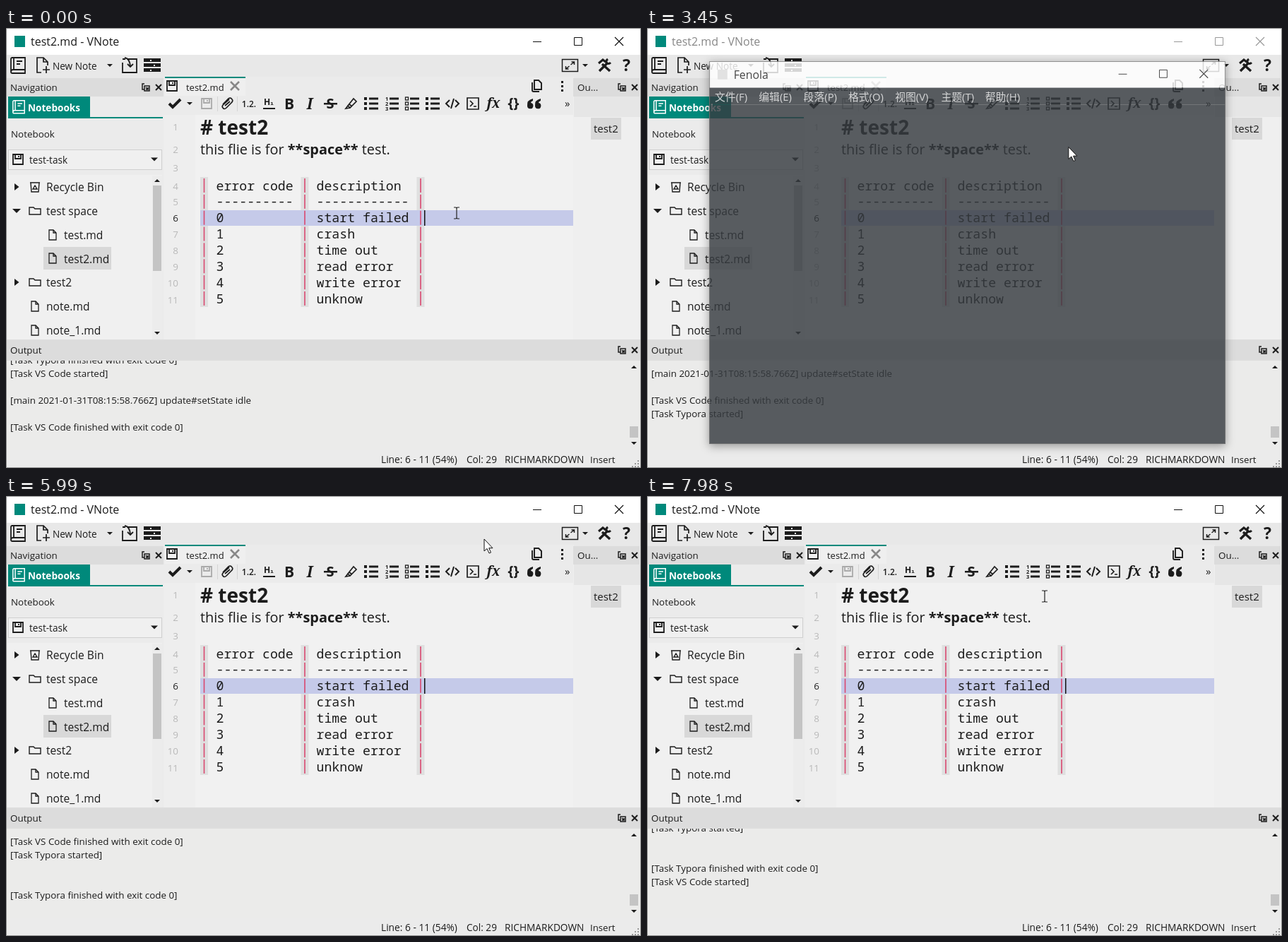
Recreate the animation shown at these times as an HTML page with a canvas. Size 899 by 623 pixels, loop 8 s.

```html
<!DOCTYPE html>
<html lang="en">
<head>
<meta charset="utf-8">
<title>Editor tasks</title>
<style>
html, body { margin: 0; width: 100%; height: 100%; overflow: hidden; background: #ebebeb; }
canvas { display: block; }
</style>
</head>
<body>
<canvas id="stage" width="899" height="623"></canvas>
<script>
const ctx = document.getElementById('stage').getContext('2d');
const SANS = '"Open Sans", "Noto Sans CJK SC", "Noto Sans CJK", sans-serif';
const MONO = '"Noto Sans Mono", monospace';
const ARIAL = '"Liberation Sans", "Noto Sans CJK SC", sans-serif';
const INK = '#1c1c1c', TEAL = '#00897b';
const LOOP = 8000;

// Screen updates come in bursts: [first, last, count]
const BURSTS = [[440, 1220, 11], [1300, 2070, 11], [2140, 2680, 8], [2830, 2910, 2],
  [3140, 3600, 7], [3760, 4520, 11], [4600, 5370, 11], [5450, 6220, 11],
  [6290, 7060, 11], [7140, 7910, 11], [7980, 8060, 2]];

// Pointer path: [time, x, y]
const POINTER = [[440, 638, 262], [800, 430, 70], [1000, 290, 8], [1220, 212, 31],
  [1450, 205, 52], [1600, 206, 56], [2070, 265, 118], [2140, 275, 118], [2450, 483, 118],
  [2680, 488, 121], [3140, 488, 121], [3450, 598, 169], [3990, 640, 148], [4600, 712, 168],
  [5290, 710, 171], [5370, 722, 95], [5600, 793, 62], [5760, 793, 62], [6220, 560, 60],
  [6520, 201, 53], [6700, 203, 58], [6900, 300, 116], [7060, 440, 120], [7250, 500, 150],
  [7400, 500, 150], [7910, 548, 142], [7980, 563, 142]];

const FAILED = [['0', 'start failed'], ['1', 'crash'], ['2', 'time out'],
  ['3', 'read error'], ['4', 'write error'], ['5', 'unknow']];

const within = (t, a, b) => t >= a && t < b;
const clamp = v => Math.max(0, Math.min(1, v));

function settle(t) {
  let shown = 0;
  for (const [a, b, n] of BURSTS) {
    if (t < a) break;
    const step = (b - a) / (n - 1);
    shown = Math.min(b, a + Math.floor((t - a + 5) / step) * step);
  }
  return shown;
}

function pointerAt(t) {
  const i = POINTER.findIndex(p => p[0] > t);
  if (i === 0) return POINTER[0].slice(1);
  if (i < 0) return POINTER[POINTER.length - 1].slice(1);
  const [t0, x0, y0] = POINTER[i - 1], [t1, x1, y1] = POINTER[i];
  const p = (t - t0) / (t1 - t0);
  return [x0 + (x1 - x0) * p, y0 + (y1 - y0) * p];
}

function box(x, y, w, h, color) {
  ctx.fillStyle = color;
  ctx.fillRect(x, y, w, h);
}

function frame(x, y, w, h, color, width = 1) {
  ctx.strokeStyle = color;
  ctx.lineWidth = width;
  ctx.strokeRect(x, y, w, h);
}

// Text with y at the middle of the capitals; returns the end x
function text(s, x, y, size = 13.4, color = INK, weight = '', family = SANS, align = 'left') {
  ctx.font = `${weight} ${size}px ${family}`;
  ctx.fillStyle = color;
  ctx.textAlign = align;
  ctx.fillText(s, x, y + size * 0.36);
  return x + ctx.measureText(s).width;
}

function line(d, x, y, color = INK, width = 1.6) {
  ctx.save();
  ctx.translate(x, y);
  ctx.strokeStyle = color;
  ctx.lineWidth = width;
  ctx.stroke(new Path2D(d));
  ctx.restore();
}

function fill(d, x, y, color = INK) {
  ctx.save();
  ctx.translate(x, y);
  ctx.fillStyle = color;
  ctx.fill(new Path2D(d));
  ctx.restore();
}

const down = (x, y, r = 4) => fill(`M${-r} ${-r / 2}H${r}L0 ${r / 2}Z`, x, y);
const up = (x, y, r = 4) => fill(`M${-r} ${r / 2}H${r}L0 ${-r / 2}Z`, x, y);
const right = (x, y, r = 5) => fill(`M${-r * .6} ${-r}V${r}L${r * .7} 0Z`, x, y);
const cross = (x, y, r, color, w) => line(`M${-r} ${-r}L${r} ${r}M${r} ${-r}L${-r} ${r}`, x, y, color, w);

function dockTitle(label, x, w, y) {
  box(x, y - 13, w, 26, '#dcdcdc');
  text(label, x + 6, y);
  const r = x + w;
  line('M-2 -5H-5V3H-2M-2 -2H5V5H-2ZM0 0L3 3M3 0V3H0', r - 25, y, INK, 1.5);
  cross(r - 7, y, 4, INK, 2);
}

function windowButtons(x, y, gap, color) {
  line('M-6 .5H6', x, y, color, 1);
  line('M-5.5 -5.5H5.5V5.5H-5.5Z', x + gap, y, color, 1);
  cross(x + gap * 2, y, 6, color, 1.2);
}

function book(x, y, color, s = 1) {
  ctx.save();
  ctx.translate(x, y);
  ctx.scale(s, s);
  line('M2 1H21V23H3Q1 23 1 21V3Q1 1 3 1M5 1V18M1 21Q1 18 4 18H21M9 6H17M9 10H14', 0, 0, color, 1.8);
  ctx.restore();
}

const floppy = (x, y, color) => line('M-7 -7H7V7H-7ZM-4 -7V-1H4V-7M1 -5V-3', x, y, color, 1.8);
const file = (x, y) => line('M-5 -7H1L5 -3V7H-5ZM1 -7V-3H5', x, y, INK, 1.3);
const folder = (x, y) => line('M-8 5V-5H-2L0 -3H8V5Z', x, y, INK, 1.4);

function bullets(x, y, dots = true) {
  for (const dy of [-7, 0, 7]) {
    if (dots) box(x - 10, y + dy - 2, 4, 4, INK);
    box(x - 3, y + dy - 1.5, 13, 3, INK);
  }
}

function drawToolbar(pressed, hover) {
  box(0, 38, 899, 33, '#e8e8e8');
  if (pressed || hover) box(195, 40, 25, 27, pressed ? '#c8c8c8' : '#dadada');
  book(6, 41, INK);
  line('M7 22H1V1H10L16 7V12M10 1V7H16M14 13V23M9 18H19', 43, 41, INK, 1.7);
  text('New Note', 66, 54, 13.6);
  down(147, 53);
  line('M8 3H21V22H1V8M1 3H5M4 1Q11 2 12 13M8 10L12 14L16 10', 164, 41, INK, 1.8);
  for (const [i, y] of [43, 50, 57].entries()) {
    box(195, y, 24, 5, INK);
    box(198 + (i === 1 ? 11 : 6), y + 2, 2, 2, '#e8e8e8');
  }
  frame(787.5, 44.5, 22, 17, INK, 1.5);
  line('M-6 5L-1 1M6 -5L1 -1M-6 1V5H-2M6 -1V-5H2', 798.5, 53, INK, 1.5);
  down(820, 53);
  line('M-7 8L5 -4M-3 -2L8 8', 847, 53, INK, 3.4);
  line('M-8 -3L-2 -8L2 -5M9 -4Q6 -1 3 -4Q2 -7 5 -9', 847, 53, INK, 3);
  text('?', 873, 53, 23, INK, 'bold');
}

function drawNavigation() {
  box(0, 96, 223, 346, '#ebebeb');
  dockTitle('Navigation', 0, 223, 84);
  box(3, 97, 116, 30, TEAL);
  box(3, 126, 219, 2, TEAL);
  book(9, 102, '#fff', .82);
  text('Notebooks', 31, 113, 13.6, '#fff', 'bold');
  text('Notebook', 7, 150);
  box(3, 172, 218, 29, '#f0f0f0');
  frame(3.5, 172.5, 217, 28, '#cfcfcf');
  floppy(17, 186, INK);
  text('test-task', 33, 187, 13.6);
  down(210, 186, 5);
  box(2, 208, 219, 233, '#f0f0f0');
  box(53, 310, 96, 32, '#d8d8d8');
  right(15, 225); down(15, 259, 6); right(15, 360);
  line('M-6 -6H6L5 7H-5ZM-7 -6H7M-3 3L0 -2L3 3Z', 41, 225, INK, 1.4);
  folder(41, 259); folder(41, 360);
  file(66, 293); file(66, 326); file(41, 394); file(41, 428);
  [['Recycle Bin', 57], ['test space', 57], ['test.md', 82], ['test2.md', 82], ['test2', 57],
    ['note.md', 57], ['note_1.md', 57]].forEach(([s, x], i) => text(s, x, 225.5 + i * 33.8, 15.6));
  box(207, 209, 14, 232, '#ececec');
  box(208, 223, 12, 121, '#c4c4c4');
  up(214, 216); down(214, 432);
}

function drawEditorBar() {
  box(223, 69, 581, 54, '#ebebeb');
  box(225, 69, 114, 27, '#efefef');
  box(225, 69, 114, 2, TEAL);
  floppy(235, 82, INK);
  text('test2.md', 255, 84, 13);
  cross(324, 82, 6, '#888', 2.6);
  line('M-3 -8H3L7 -4V5H-3ZM-6 -5V6Q-6 8 -4 8H4', 751, 82, INK, 1.9);
  for (const dy of [-6, 0, 6]) box(786, 81 + dy, 3, 3, INK);

  line('M-8 0L-3 5L8 -6', 239, 107, INK, 4);
  down(260, 107);
  floppy(284, 107, '#aaa');
  line('M-7 1L1 -7Q4 -9 6 -6Q8 -4 5 -1L-2 6Q-5 9 -7 6Q-9 4 -6 1L2 -6M-4 3L3 -3', 314, 107, INK, 1.7);
  text('1.2.', 344, 108, 12, INK, '600', SANS, 'center');
  box(299, 97, 1, 21, '#d4d4d4'); box(327, 97, 1, 21, '#d4d4d4');
  text('H₁', 372, 105, 12, INK, 'bold', SANS, 'center');
  box(364, 113, 17, 2, INK);
  text('B', 401, 107, 21, INK, 'bold', SANS, 'center');
  text('I', 430, 107, 21, INK, 'italic bold', '"Noto Serif", serif', 'center');
  text('S', 459, 107, 20, INK, 'bold', SANS, 'center');
  box(450, 106, 19, 2.5, INK);
  line('M-4 3L4 -7L8 -3L-1 6ZM-4 3L-7 7L-1 6M-2 1L2 4', 488, 107, INK, 1.7);
  bullets(517, 107);
  bullets(546, 107, false);
  [1, 2, 3].forEach((n, i) => text(n, 537, 100 + i * 7, 7.5, INK, 'bold'));
  bullets(575, 107, false);
  for (const y of [99, 106, 113]) frame(565.5, y - 1, 4, 4, INK, 1.3);
  bullets(604, 107);
  line('M-4 -5L-9 0L-4 5M4 -5L9 0L4 5M2 -7L-2 7', 632, 107, INK, 2);
  line('M-8 -8H8V8H-8ZM-4 -4L0 0L-4 4M1 4H5', 661, 107, INK, 1.7);
  text('fx', 690, 106, 19, INK, 'italic bold', '"Noto Serif", serif', 'center');
  text('{}', 718.5, 106, 20, INK, 'bold', SANS, 'center');
  for (const x of [738, 749]) fill('M0 10Q-1 2 8 0L8 3Q5 4 5 6A4.2 4.2 0 1 1 0 10Z', x, 100);
  text('»', 791, 107, 15);
}

function drawEditor(caret) {
  box(223, 123, 45, 318, '#eeeeee');
  box(268, 123, 535, 318, '#f1f1f1');
  [140, 172, 198, 224, 246, 269, 292, 315, 338, 361, 385].forEach((y, i) =>
    text(i + 1, 244, y, 13.4, i === 5 ? '#222' : '#b9b9b9', '', SANS, 'right'));
  text('# test2', 275, 140.5, 28, INK, 'bold');
  let x = text('this flie is for ', 275, 172, 19.9);
  x = text('**space**', x, 172, 19.9, INK, 'bold');
  text(' test.', x, 172, 19.9);

  const pipes = [280.5, 423, 587];
  for (const p of pipes) box(p - 5.5, 211, 11, 184, '#dfdfdf');
  box(275, 258, 528, 22, '#c5cae9');
  [['error code', 'description'], ['----------', '------------'], ...FAILED].forEach((row, i) => {
    const y = 223 + i * 22.85;
    row.forEach((s, c) => text(s, c ? 439.5 : 297.5, y, 18.2, INK, '', MONO));
    for (const p of pipes) box(p - .8, y - 10, 1.6, 20, '#d9486f');
  });
  if (caret) box(592, 258, 1.5, 22, '#111');
}

function drawOutline() {
  box(803, 96, 96, 346, '#efefef');
  dockTitle('Ou...', 803, 94, 84);
  box(804, 97, 94, 29, '#e6e6e6');
  box(828, 127, 43, 31, '#d8d8d8');
  text('test2', 832, 143, 15);
}

function drawOutput(t) {
  box(0, 441, 899, 30, '#dddddd');
  dockTitle('Output', 0, 897, 456);
  box(0, 471, 899, 126, '#ebebea');
  const typora = '[Task Typora finished with exit code 0]';
  const code = '[Task VS Code finished with exit code 0]';
  const update = '[main 2021-01-31T08:15:58.766Z] update#setState idle';
  const typoraStart = '[Task Typora started]', codeStart = '[Task VS Code started]';
  const log =
    t < 2900 ? [typora, codeStart, , update, , code] :
    t < 5830 ? [, update, , code, typoraStart] :
    t < 7500 ? [, code, typoraStart, , , typora] :
    [typoraStart, , , typora, codeStart];
  ctx.save();
  ctx.beginPath();
  ctx.rect(0, 471, 880, 125);
  ctx.clip();
  log.forEach((s, i) => text(s, 6, 470.5 + i * 18.85, 13.4));
  ctx.restore();
  up(889, 480); down(889, 588);
  box(883, 564, 12, 16, '#c4c4c4');
  box(0, 597, 899, 26, '#ebebeb');
  text('Line: 6 - 11 (54%)', 531, 611, 13.75);
  text('Col: 29', 652, 611, 13.6);
  text('RICHMARKDOWN', 706, 611, 13.7);
  text('Insert', 827, 611, 13.2);
  for (let i = 0; i < 3; i++) for (let j = 0; j <= i; j++) box(894 - j * 4, 612 + i * 4, 2, 2, '#999');
}

function panel(x, y, w, h) {
  box(x + 3, y + 3, w, h, '#808080');
  box(x, y, w, h, '#ebebeb');
  frame(x + .5, y + .5, w - 1, h - 1, '#b0b0b0');
}

function drawMenu(sub, px, py) {
  panel(192, 68, 242, 67);
  if (sub || py > 102) box(193, 102, 240, 32, '#d0d0d0');
  else if (py > 70) box(193, 70, 240, 32, '#d0d0d0');
  for (const y of [79, 86, 93]) {
    line('M0 0L2 2L6 -3', 199, y - 1, INK, 1.6);
    box(207, y - 1.5, 12, 2.4, INK);
  }
  text('Hello Tasks', 248, 86, 15.8);
  text('Alt+H, T', 341, 86, 15.8);
  text('Open File with', 248, 118, 15.5);
  right(424, 86, 4); right(424, 118, 4);
  if (!sub) return;
  panel(430, 101, 150, 65);
  if (px > 430) box(431, py < 133 ? 102 : 133, 148, 31, '#d0d0d0');
  box(441, 111, 13, 13, '#aaa');
  box(441, 142, 14, 14, INK);
  text('Fenola', 486, 118, 15.5);
  text('LB Pane', 486, 150, 15.5);
}

// Casts a soft shadow outside the box only, so a fading window stays clear
function softShadow(x, y, w, h) {
  ctx.save();
  ctx.beginPath();
  ctx.rect(0, 0, 899, 623);
  ctx.rect(x, y, w, h);
  ctx.clip('evenodd');
  ctx.shadowColor = 'rgba(0,0,0,.45)';
  ctx.shadowBlur = 12;
  ctx.shadowOffsetY = 3;
  box(x, y, w, h, '#000');
  ctx.restore();
}

function drawViewer(t, scroll) {
  const loaded = t >= 3750;
  softShadow(84, 44, 739, 548);
  box(84, 44, 739, 38, '#fff');
  box(84, 82, 739, 24, loaded ? '#27282c' : '#363b40');
  box(84, 106, 739, 486, '#363b40');
  box(96, 56, 14, 14, '#dddddd');
  text((loaded ? 'test2.md - ' : '') + 'Fenola', 119, 63, 16);
  windowButtons(676, 62, 58, '#222');
  [['文件(F)', 92], ['编辑(E)', 155], ['段落(P)', 219], ['格式(O)', 283], ['视图(V)', 350],
    ['主题(T)', 416], ['帮助(H)', 479]].forEach(([s, x]) => text(s, x, 95, 15, '#f2f2f2'));
  if (loaded) drawPage(t, scroll);
  frame(84.5, 44.5, 738, 547, '#777');
}

function drawPage(t, scroll) {
  const soft = '#b8bfc6', bright = '#e2e2e2';
  ctx.save();
  ctx.beginPath();
  ctx.rect(85, 106, 737, 450);
  ctx.clip();
  ctx.translate(0, -scroll);
  const end = text('test', 122, 280, 41, bright, '', 'Lato, sans-serif');
  text('2', end, 282.5, 34, bright, '', 'Lato, sans-serif');
  let x = text('this flie is for ', 122, 351, 19.8, soft, '', ARIAL);
  x = text('space', x, 351, 19.8, bright, 'bold', ARIAL);
  text(' test.', x, 351, 19.8, soft, '', ARIAL);

  const rows = [['error code', 'description'], ...FAILED], pitch = 44.7;
  rows.forEach((row, i) => row.forEach((s, c) => {
    const last = text(s, c ? 450.5 : 135, 419.5 + i * pitch, 19.8, i ? soft : bright, i ? '' : 'bold', ARIAL);
    if (c && i === 6 && t > 4600) box(last + .5, 676, 1.2, 22, '#ddd');
  }));
  for (let i = 0; i <= rows.length; i++) box(122, Math.round(396.5 + i * pitch), 655, 1, '#4b5056');
  for (const bx of [122, 438, 776]) box(bx, 396.5, 1, rows.length * pitch, '#4b5056');
  ctx.restore();

  const p = scroll / 260;
  box(813, 106 + 166 * p, 9, 289 - 6 * p, '#6c6f72');
  box(85, 556, 737, 1, '#60656a');
  line('M6 0A6 6 0 1 1 -6 0A6 6 0 1 1 6 0', 103, 575, '#a3a8ad', 1.5);
  line('M-4 -4L-9 0L-4 4M4 -4L9 0L4 4M2 -6L-2 6', 141, 575, '#a3a8ad', 1.5);
  text(t < 4450 ? '0 Words' : '26 词', 794, 575, 14.8, '#989da2', '', ARIAL, 'right');
}

function drawPointer(x, y, beam, color) {
  if (beam) return line('M-4 -8H-1L0 -7L1 -8H4M0 -7V7M-4 8H-1L0 7L1 8H4', x, y, color, 1.2);
  const arrow = 'M0 0V17L4 13.5L7 20L9.5 19L6.7 12.7H12Z';
  fill(arrow, x, y, '#fff');
  line(arrow, x, y, '#111', 1);
}

function draw(t) {
  const [px, py] = pointerAt(t);
  const menu = within(t, 1525, 2820) || within(t, 6670, 7440);
  const sub = within(t, 2200, 2820) || within(t, 6980, 7440);
  const active = !within(t, 3130, 5750);
  const caret = t < 1400 || within(t, 2820, 3130) || within(t, 5900, 6400) || t > 7440;
  const hover = active && within(px, 194, 220) && within(py, 40, 67);
  const tone = active ? '#111' : '#999';

  box(0, 0, 899, 623, '#ebebeb');
  box(0, 0, 899, 38, '#fff');
  box(12, 11, 15, 16, TEAL);
  text('test2.md - VNote', 35, 19, 16, active ? INK : '#888');
  windowButtons(752, 19, 58, tone);
  drawToolbar(menu, hover);
  drawNavigation();
  drawEditorBar();
  drawEditor(caret);
  drawOutline();
  drawOutput(t);
  frame(.5, .5, 898, 622, '#8a8a8a');
  if (menu) drawMenu(sub, px, py);

  const shown = clamp((t - 3293) / 230) * (1 - clamp((t - 5650) / 230));
  if (shown > 0) {
    const grow = .9 + .1 * (1 - (1 - shown) ** 2);
    const glide = clamp((t - 4600) / 550);
    ctx.save();
    ctx.globalAlpha = Math.sqrt(shown);
    ctx.translate(453.5, 318);
    ctx.scale(grow, grow);
    ctx.translate(-453.5, -318);
    drawViewer(t, 260 * glide * glide * (3 - 2 * glide));
    ctx.restore();
  }

  const onPage = within(t, 3750, 5650) && py > 106;
  const onText = active && !menu && px > 268 && px < 803 && within(py, 123, 441);
  drawPointer(px, py, onPage || onText, onPage ? '#ddd' : '#222');
}

function tick() {
  draw(settle(performance.now() % LOOP));
  requestAnimationFrame(tick);
}
tick();
</script>
</body>
</html>
```
